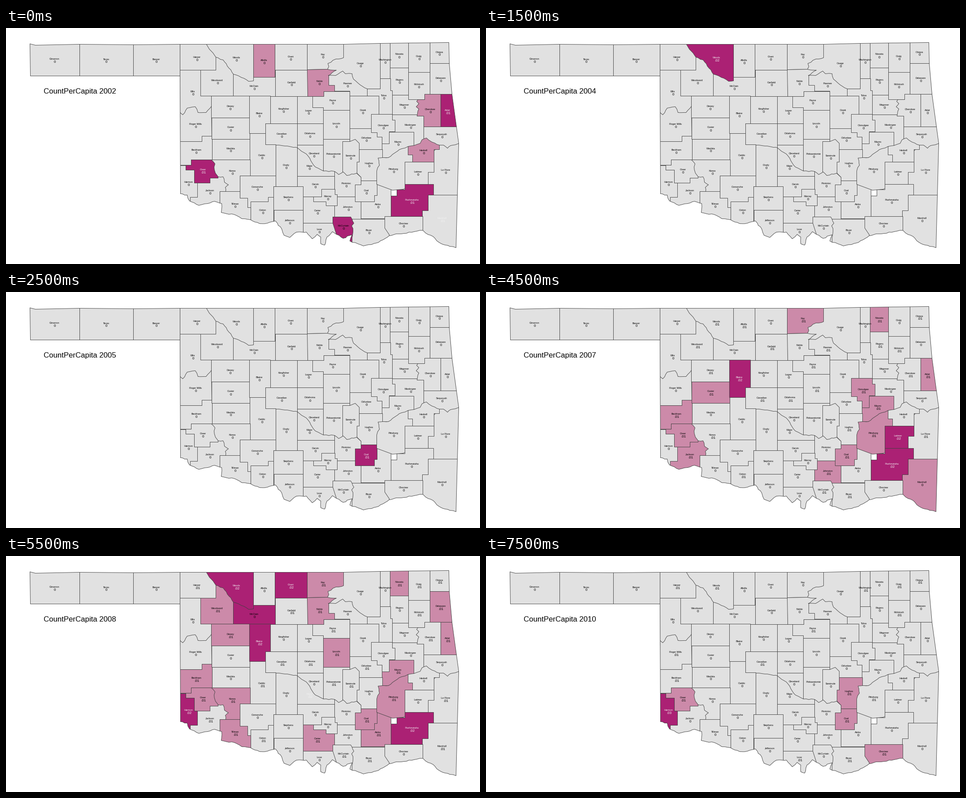
A matplotlib script for the animation above (8000 ms loop, 1058 by 529 pixels).

```python
import random

import matplotlib.pyplot as plt
import numpy as np
from matplotlib.animation import FuncAnimation
from matplotlib.collections import PolyCollection
from matplotlib.path import Path

W, H, DPI = 1058, 529, 64
PX = 72 / DPI
GRAY, PINK, DARK = "#e1e1e1", "#cc8aa9", "#ab2174"
INK, LIGHT, EDGE = "#000000", "#f2f2f2", "#404040"
FAR_N, FAR_S, FAR_E = 20, 500, 1020  # beyond the state line, cut off by it

plt.rcParams["font.family"] = "Liberation Sans"
rng = random.Random(4)
counties = {}


def steps(*v):
    """Survey line: start x, y, then run to a new x, a new y, a new x ..."""
    pos = list(v[:2])
    pts = [tuple(pos)]
    for i, value in enumerate(v[2:]):
        pos[i % 2] = value
        pts.append(tuple(pos))
    return pts


def river(*keys):
    """Line through key points that wanders a little between them."""
    pts = [keys[0]]
    for (x0, y0), (x1, y1) in zip(keys, keys[1:]):
        n = max(1, round(np.hypot(x1 - x0, y1 - y0) / 6))
        for i in range(1, n):
            t = i / n
            pts.append((x0 + (x1 - x0) * t + rng.uniform(-1, 1),
                        y0 + (y1 - y0) * t + rng.uniform(-1, 1)))
        pts.append((x1, y1))
    return pts


def block(name, *v):
    """County with square corners, closed by a last run back to its first x."""
    counties[name] = steps(*v, v[0])


def shape(name, *parts):
    counties[name] = [p for part in parts for p in part]


def row(xs, top, bottom, *row_names):
    for name, x0, x1 in zip(row_names, xs, xs[1:]):
        block(name, x0, top, x1, bottom)


# Counties lie on top of the ones before them, so each border is given once.
# North-west
row((40, 164, 284, 388), FAR_N, 120, "Cimarron", "Texas", "Beaver")
block("Ellis", 388, 90, 458, 200)
block("Woodward", 434, 60, 507, 152)
block("McClain", 507, 100, 601, 153)
block("Harper", 388, FAR_N, 468, 94)
row((552, 600, 672), FAR_N, 94, "Alfalfa", "Grant")
block("Alfalfa", 552, FAR_N, 600, 110)
block("Garfield", 601, 94, 673, 153)
shape("Woods", river((443, 30), (451, 43), (468, 65), (484, 71), (507, 103),
                     (530, 112), (541, 119), (552, 118)), [(552, FAR_N), (443, FAR_N)])
shape("Roger Mills", river((388, 189), (394, 194), (404, 179), (422, 176),
                           (428, 189), (446, 189), (458, 175)), [(459, 254), (388, 254)])
block("Beckham", 380, 254, 437, 242, 460, 295, 413, 307)
block("Dewey", 458, 152, 543, 201)
block("Custer", 459, 201, 544, 249)
block("Washita", 460, 249, 545, 295)

# North-east
block("Osage", 710, FAR_N, 835, 136)
shape("Pawnee", river((719, 106), (735, 106), (751, 96), (757, 102), (772, 102),
                      (775, 114), (790, 127), (806, 136)),
      [(808, 148), (806, 152)], steps(767, 153, 767, 141, 719))
shape("Kay", [(672, FAR_N), (753, FAR_N)],
      river((753, 66), (736, 69), (718, 79), (720, 86), (717, 92)), [(672, 93)])
shape("Noble", [(672, 93)], river((717, 92), (737, 94), (719, 106)),
      steps(719, 106, 720, 128, 733, 142, 709, 153, 673))
row((835, 857, 898, 946), FAR_N, 113, "Washington", "Nowata", "Craig")
block("Rogers", 857, 89, 898, 150)
block("McIntosh", 898, 99, 946, 160)
block("Ottawa", 946, FAR_N, FAR_E, 79)
block("Delaware", 946, 79, FAR_E, 148)
block("Wagoner", 862, 150, 934, 194)
counties["McIntosh"] = counties.pop("McIntosh")
block("Muskogee", 862, 194, 932, 270)
block("Sequoyah", 932, 221, FAR_E, 280)
shape("Cherokee", steps(934, 160, 934, 148, 970, 221, 932, 197, 917),
      river((917, 197), (921, 181), (915, 176), (921, 169), (916, 164), (919, 160)))
block("Adair", 970, 148, FAR_E, 221)

# Centre
block("Blaine", 543, 152, 590, 214, 579, 236)
row((590, 650, 708), 153, 214, "Kingfisher", "Logan")
block("Canadian", 579, 214, 650, 275)
block("Oklahoma", 650, 214, 708, 262)
block("Payne", 684, 153, 709, 142, 767, 184, 708, 178)
block("Lincoln", 708, 184, 767, 249)
block("Creek", 767, 152, 833, 226)
block("Tulsa", 806, 136, 835, 113, 858, 140, 862, 193, 832, 152)
block("Okfuskee", 767, 225, 840, 272)
block("Cleveland", 650, 262, 708, 330)
block("Pottawatomie", 708, 249, 767, 335)
block("Mayes", 839, 233, 910, 290)
block("Okmulgee", 815, 193, 862, 206, 868, 232, 855, 259, 839, 244, 828, 234)
shape("Seminole", [(751, 254), (767, 254), (779, 249), (788, 258)],
      [(788, 330), (751, 330)])
block("Caddo", 544, 236, 579, 261, 602, 332)
shape("Grady", river((602, 262), (622, 264), (641, 267), (650, 268)),
      [(650, 355), (602, 355)])
shape("Major", river((650, 268), (670, 282), (690, 311), (708, 320), (733, 321)),
      [(733, 332), (650, 332)])

# South
block("Garvin", 650, 332, 733, 378)
block("Carter", 663, 378, 733, 437)
block("Love", 663, 437, 740, FAR_S)
block("Johnston", 733, 378, 792, 429)
block("Bryan", 768, 428, 858, FAR_S)
shape("Pontotoc", river((733, 321), (742, 328), (752, 322), (760, 330), (782, 325)),
      [(792, 334), (792, 378), (733, 378)])
block("Murray", 704, 361, 734, 373, 739, 398, 714, 389, 686, 378)
shape("McCurtain", [(729, 423)],
      river((769, 423), (776, 437), (771, 443), (774, 449), (772, 470)),
      [(772, FAR_S), (738, FAR_S), (737, 462), (729, 437)])
block("Kiowa", 458, 295, 545, 331, 522, 380)
block("Comanche", 522, 331, 602, 355, 597, 404)
block("Stephens", 597, 355, 663, 408)
block("Jefferson", 598, 408, 663, FAR_S)
block("Cotton", 546, 389, 585, 379, 597, FAR_S)
block("Tillman", 477, 366, 522, 381, 539, 402, 546, FAR_S)
shape("Jackson", river((473, 333), (484, 333), (487, 345), (496, 351), (489, 357), (490, 366)),
      steps(477, 366, 477, 420, 400, 346))
shape("Greer", [(413, 295)],
      river((458, 295), (466, 304), (464, 311), (467, 325), (473, 333)),
      steps(473, 336, 455, 347, 420, 318, 401, 307, 413))
block("Harmon", 380, 308, 401, 318, 420, 347, 427, 379, 411, 400)

# South-east
block("Atoka", 792, 345, 859, 427)
shape("Hughes", steps(783, 325, 783, 300, 788, 272, 840, 342, 792, 334))
block("Coal", 792, 342, 828, 375, 822, 389, 779, 351)
shape("Pittsburg", river((897, 265), (883, 270), (862, 283), (853, 290), (830, 291),
                         (833, 307), (827, 320)),
      [(827, 350), (862, 363), (886, 361), (909, 350), (909, 265)])
shape("Le Flore", river((967, 262), (976, 262), (985, 269), (992, 263), (FAR_E, 257)),
      [(FAR_E, 375), (941, 375), (941, 290)])
shape("Haskell", river((897, 265), (910, 263), (924, 258), (928, 250), (938, 246),
                       (950, 255), (967, 262)),
      steps(967, 272, 955, 300, 907, 284, 897))
block("Latimer", 890, 300, 955, 323, 942, 350)
block("Marshall", 929, 374, FAR_E, FAR_S)
shape("Choctaw", [(845, 422), (930, 422), (930, FAR_S), (855, FAR_S), (855, 463), (845, 448)])
block("Pushmataha", 890, 350, 954, 374, 942, 409, 929, 422, 859, 376, 872, 362)

north = [(53, 35), (65, 38), (163, 36), (284, 37), (388, 36), (753, 36), (835, 34), (988, 32)]
east = [(989, 80), (995, 148), (1010, 258)]
south = river(
    (1004, 492), (990, 489), (980, 486), (966, 480), (953, 467), (936, 459), (930, 453),
    (916, 455), (888, 460), (870, 461), (855, 465), (831, 480), (815, 485), (797, 488),
    (767, 477), (772, 463), (752, 471), (737, 462), (728, 456), (716, 468), (711, 486),
    (702, 483), (702, 468), (694, 462), (683, 472), (670, 457), (648, 457), (633, 469),
    (620, 464), (615, 450), (601, 432), (583, 437), (566, 438), (545, 429), (526, 427),
    (510, 418), (480, 413), (481, 393), (465, 388), (450, 393), (430, 397), (409, 387),
    (404, 374), (389, 371))
state = Path(north + east + south + [(388, 107), (54, 107), (53, 35)])


def label_spots():
    """Centre of the visible part of every county."""
    grid = np.stack(np.meshgrid(np.arange(0, W, 2), np.arange(0, H, 2)), -1).reshape(-1, 2)
    grid = grid[state.contains_points(grid)]
    owner = np.full(len(grid), -1)
    for k, pts in enumerate(counties.values()):
        owner[Path(pts).contains_points(grid)] = k
    return [grid[owner == k].mean(axis=0) for k in range(len(counties))]


def split(text):
    return set(text.split(", ")) if text else set()


# Each year: dark counties, pink counties, then counties labelled .01, .02, .03
YEARS = {
    2002: ("Adair, Greer, Pushmataha, McCurtain",
           "Alfalfa, Noble, Cherokee, Haskell",
           "Adair, Greer, Pushmataha, Marshall", "", ""),
    2003: ("", "Washington, Marshall", "", "", ""),
    2004: ("Woods", "", "", "Woods", ""),
    2005: ("Coal", "", "Coal", "", ""),
    2006: ("Blaine, Custer, Harmon, Tillman, Pushmataha",
           "Kay, Washington, Woodward, McClain, Garfield, Pawnee, Dewey, Adair, Mayes, "
           "Hughes, Pittsburg, Kiowa, Jackson, Jefferson, Choctaw",
           "Dewey, Blaine, Custer, Harmon, Tillman, Pushmataha", "", ""),
    2007: ("Blaine, Latimer, Pushmataha",
           "Kay, Nowata, Adair, Okmulgee, Custer, Beckham, Greer, Jackson, Mayes, "
           "Pittsburg, Coal, Johnston, Marshall",
           "Woods, Alfalfa, Kay, Nowata, Ottawa, Woodward, Garfield, Pawnee, Rogers, "
           "McIntosh, Dewey, Payne, Cherokee, Adair, Custer, Canadian, Oklahoma, Lincoln, "
           "Okmulgee, Mayes, Beckham, Greer, Kiowa, Jackson, Hughes, Pittsburg, Coal, "
           "Johnston, Cotton, McCurtain, Bryan, Le Flore",
           "Blaine, Latimer, Pushmataha", ""),
    2008: ("Woods, Grant, McClain, Blaine, Harmon, Pushmataha",
           "Kay, Nowata, Woodward, Noble, Delaware, Dewey, Adair, Lincoln, Beckham, Greer, "
           "Kiowa, Mayes, Pittsburg, Tillman, Carter, Atoka, Coal",
           "Harper, Kay, Nowata, Craig, Ottawa, Woodward, Garfield, Noble, Delaware, "
           "McIntosh, Dewey, Payne, Cherokee, Adair, Lincoln, Oklahoma, Canadian, Okfuskee, "
           "Mayes, Beckham, Pottawatomie, Seminole, Caddo, Greer, Kiowa, Pittsburg, "
           "Le Flore, Jackson, Coal, Tillman, Cotton, Carter, Atoka, McCurtain, Bryan, "
           "Marshall",
           "Woods, Grant, Blaine, Harmon, Pushmataha, Major", ""),
    2009: ("Harmon, Blaine, Pushmataha",
           "Nowata, Beckham, Greer, Kiowa, Pittsburg, Coal, Atoka",
           "Harper, Woods, Nowata, Craig, Ottawa, McIntosh, Payne, Adair, Canadian, "
           "Beckham, Greer, Kiowa, Pittsburg, Coal, Atoka, Bryan, Hughes, Le Flore",
           "Harmon, Blaine, Pushmataha", ""),
    2010: ("Harmon", "Greer, Hughes, Coal, Choctaw",
           "Harper, Woods, Ottawa, Craig, Washington, Payne, McIntosh, Roger Mills, "
           "Canadian, Beckham, Greer, Hughes, Pittsburg, Coal, Bryan, Choctaw, Love",
           "", "Harmon"),
}
# These labels take their ink from the partner's fill
PARTNER = {"McClain": "Major", "Major": "McClain",
           "McCurtain": "Marshall", "Marshall": "McCurtain"}

fig = plt.figure(figsize=(W / DPI, H / DPI), dpi=DPI, facecolor="white")
ax = fig.add_axes([0, 0, 1, 1])
ax.set_xlim(-0.5, W - 0.5)
ax.set_ylim(H - 0.5, -0.5)
ax.axis("off")


def write(x, y, text, px, ha="center"):
    return ax.text(x, y, text, fontsize=px * PX, ha=ha, va="baseline", color=INK)


fills = PolyCollection(list(counties.values()), facecolors=GRAY, edgecolors=EDGE,
                       linewidths=0.9 * PX, snap=False)
ax.add_collection(fills, autolim=False)
fills.set_clip_path(state, ax.transData)
ax.plot(*state.vertices.T, color=EDGE, lw=0.9 * PX, snap=False)

spots = label_spots()
title = write(84, 147, "", 16.7, "left")
tags = [write(x, y - 1, name, 5.5) for name, (x, y) in zip(counties, spots)]
values = [write(x, y + 6, "0", 8) for x, y in spots]


def update(i):
    year = 2002 + (i + 1) // 2
    dark, pink, one, two, three = map(split, YEARS[year])
    title.set_text(f"CountPerCapita {year}")
    fills.set_facecolor([DARK if n in dark else PINK if n in pink else GRAY
                         for n in counties])
    for n, (x, _), tag, value in zip(counties, spots, tags, values):
        text = ".01" if n in one else ".02" if n in two else ".03" if n in three else "0"
        ink = LIGHT if PARTNER.get(n, n) in dark else INK
        value.set_text(text)
        value.set_x(x + (0.8 if text == "0" else 1.4))
        value.set_color(ink)
        tag.set_color(ink)
    return [fills, title, *tags, *values]


anim = FuncAnimation(fig, update, frames=16, interval=500, repeat=True,
                     repeat_delay=0, blit=False)
plt.show()
```
